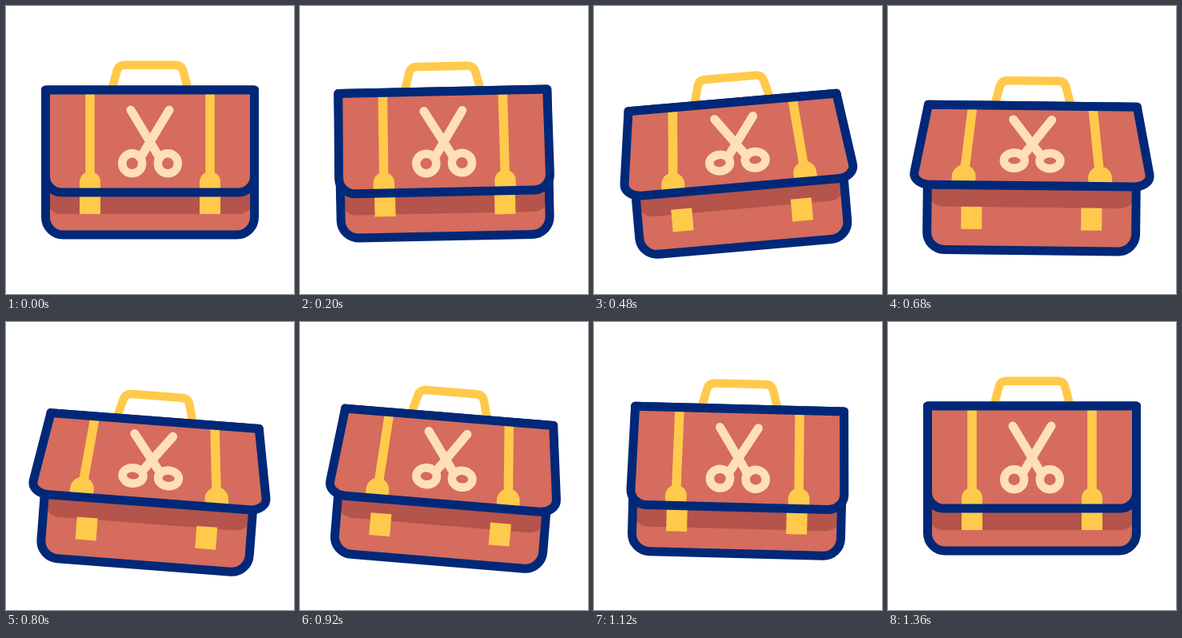
An HTML page with a canvas for the animation above (1.4 s loop, 360 by 360 pixels).

```html
<!DOCTYPE html>
<html lang="en">
<head>
<meta charset="utf-8">
<title>Briefcase</title>
<style>
  html, body { margin: 0; width: 100%; height: 100%; overflow: hidden; background: #fff; }
  canvas { display: block; width: 360px; height: 360px; }
</style>
</head>
<body>
<canvas id="stage"></canvas>
<script>
const canvas = document.getElementById('stage');
const ctx = canvas.getContext('2d');
const ratio = window.devicePixelRatio || 1;
canvas.width = canvas.height = 360 * ratio;

const LOOP = 1400, STEP = 40;
const NAVY = '#002878', RED = '#d56c5d', SHADE = '#b4544a';
const YELLOW = '#ffca4b', CREAM = '#ffdfb9';
const MID = 180, TOP = 105, BOTTOM = 233, LEFT = 49.5, RIGHT = 310.5;
const PIVOT_Y = 186, DROP = 19.8;

const smooth = x => x * x * (3 - 2 * x);
const smoother = x => x * x * x * (x * (6 * x - 15) + 10);
const ease = x => (smooth(x) + smoother(x)) / 2;

// Keys are [time, value] pairs, eased between neighbours.
function track(keys, t, curve) {
  if (t <= keys[0][0]) return keys[0][1];
  for (let i = 1; i < keys.length; i++) {
    const [t0, v0] = keys[i - 1], [t1, v1] = keys[i];
    if (t < t1) return v0 + (v1 - v0) * curve((t - t0) / (t1 - t0));
  }
  return keys[keys.length - 1][1];
}

const openKeys = [[75, 0], [680, 1], [1300, 0]];
const tiltKeys = [[75, 0], [465, -5], [861, 5], [1266, 0]];

function stroke(color, width) {
  ctx.strokeStyle = color;
  ctx.lineWidth = width;
  ctx.stroke();
}

function fill(color) {
  ctx.fillStyle = color;
  ctx.fill();
}

function line(a, b) {
  ctx.beginPath();
  ctx.moveTo(...a);
  ctx.lineTo(...b);
}

function roundedBase(top, bottom, radius) {
  ctx.beginPath();
  ctx.moveTo(LEFT, top);
  ctx.lineTo(RIGHT, top);
  ctx.arcTo(RIGHT, bottom, MID, bottom, radius);
  ctx.arcTo(LEFT, bottom, LEFT, top, radius);
  ctx.closePath();
}

function drawHandle() {
  ctx.beginPath();
  ctx.moveTo(133, 102);
  ctx.lineTo(138.5, 81.5);
  ctx.quadraticCurveTo(140.5, 73.7, 148.5, 73.7);
  ctx.lineTo(211.5, 73.7);
  ctx.quadraticCurveTo(219.5, 73.7, 221.5, 81.5);
  ctx.lineTo(227, 102);
  stroke(YELLOW, 10.5);
}

function drawBody(flapBottom) {
  roundedBase(TOP, 286, 22);
  fill(RED);
  ctx.save();
  ctx.clip();
  roundedBase(TOP, flapBottom + 27, 20);
  fill(SHADE);
  ctx.restore();
  ctx.fillStyle = YELLOW;
  for (const x of [105, 255]) ctx.fillRect(x - 13, 232, 26, 28);
  roundedBase(TOP, 286, 22);
  stroke(NAVY, 11);
}

function traceFlap(warp) {
  const curve = (...points) => ctx.bezierCurveTo(...points.flatMap(p => warp(...p)));
  const r = 20, h = 9;
  ctx.beginPath();
  ctx.moveTo(LEFT, TOP);
  ctx.lineTo(RIGHT, TOP);
  ctx.lineTo(...warp(RIGHT, BOTTOM - r));
  curve([RIGHT, BOTTOM - h], [RIGHT - h, BOTTOM], [RIGHT - r, BOTTOM]);
  ctx.lineTo(...warp(LEFT + r, BOTTOM));
  curve([LEFT + h, BOTTOM], [LEFT, BOTTOM - h], [LEFT, BOTTOM - r]);
  ctx.closePath();
}

function drawStrap(x, warp, open) {
  line(warp(x, TOP), warp(x, 220));
  stroke(YELLOW, 11.5);
  const [px, py] = warp(x, 220);
  const end = warp(x, BOTTOM);
  const r = 13 * (1 + 0.15 * open);
  ctx.beginPath();
  ctx.arc(px, py, r, Math.PI, 0);
  ctx.lineTo(end[0] + r, end[1]);
  ctx.lineTo(end[0] - r, end[1]);
  fill(YELLOW);
}

function drawScissors(open) {
  const squash = 1 - 0.233 * open;
  const y = v => TOP - 1.8 * open + (v - TOP) * squash;
  ctx.lineCap = 'round';
  for (const side of [-1, 1]) {
    line([MID + 24 * side, y(130)], [MID - 11.5 * side, y(189)]);
    stroke(CREAM, 11);
    ctx.beginPath();
    ctx.ellipse(MID + 22.3 * side, y(196.8), 12.5 + 0.5 * open, 12.5 * squash, 0, 0, 2 * Math.PI);
    stroke(CREAM, 10.5);
  }
  ctx.lineCap = 'butt';
}

function draw(t) {
  const open = track(openKeys, t, ease);
  const tilt = track(tiltKeys, t, smooth) * Math.PI / 180;
  const warp = (x, y) => {
    const depth = (y - TOP) / (BOTTOM - TOP);
    return [MID + (x - MID) * (1 + 0.15 * open * depth), TOP + (y - TOP) * (1 - 0.22 * open)];
  };

  ctx.setTransform(ratio, 0, 0, ratio, 0, 0);
  ctx.fillStyle = '#fff';
  ctx.fillRect(0, 0, 360, 360);
  ctx.translate(MID, PIVOT_Y + DROP * open);
  ctx.rotate(tilt);
  ctx.translate(-MID, -PIVOT_Y);
  ctx.lineJoin = 'round';

  drawHandle();
  drawBody(warp(MID, BOTTOM)[1]);
  traceFlap(warp);
  fill(RED);
  for (const x of [105, 255]) drawStrap(x, warp, open);
  drawScissors(open);
  traceFlap(warp);
  stroke(NAVY, 11);
}

function tick() {
  const t = performance.now() % LOOP;
  draw(t < 3 * STEP ? 0 : Math.floor(t / STEP) * STEP);
  requestAnimationFrame(tick);
}
tick();
</script>
</body>
</html>
```
